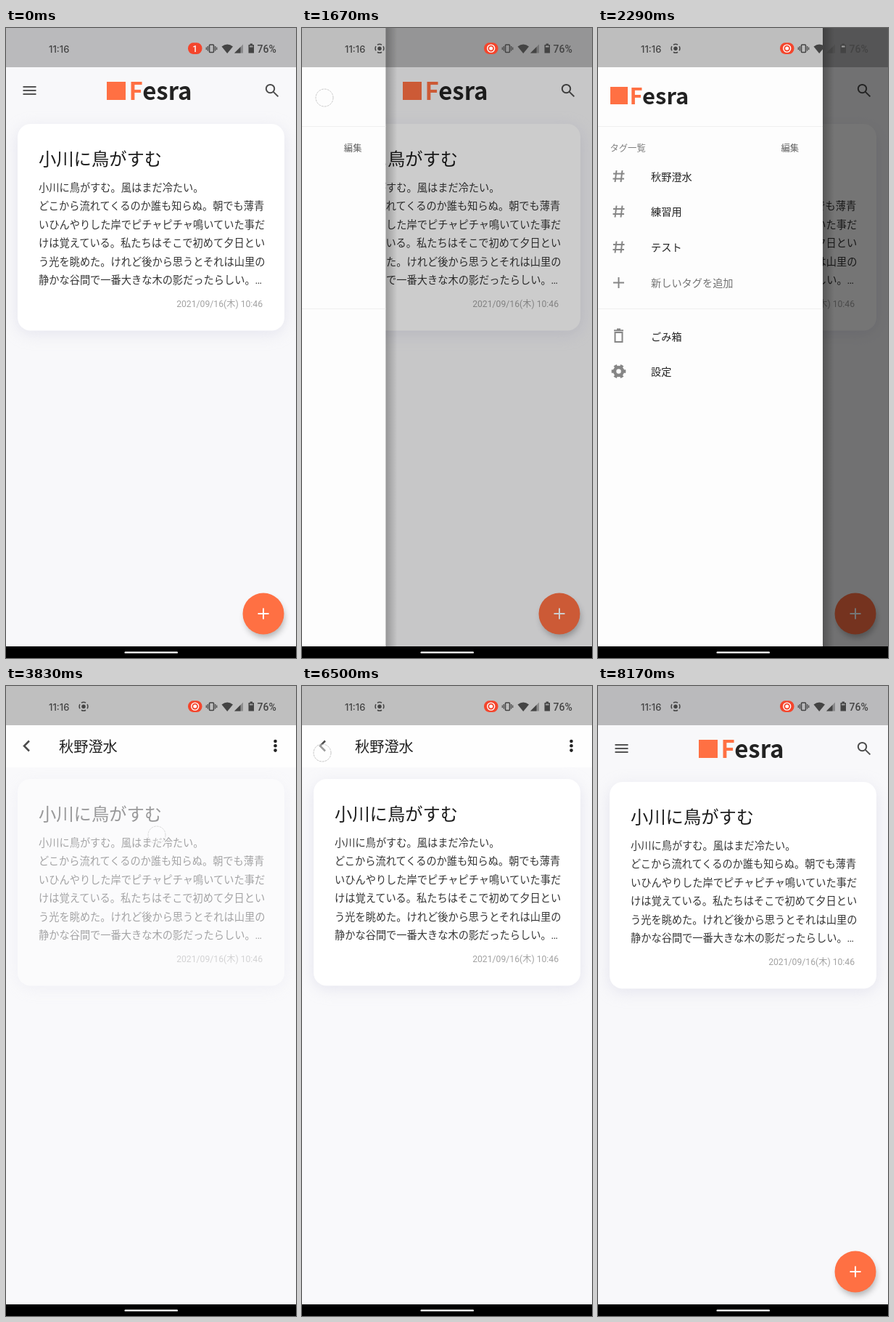
An HTML page for the animation above (8.93 s loop, 400 by 867 pixels).

```html
<!DOCTYPE html>
<html lang="ja">
<head>
<meta charset="utf-8">
<title>Notes app</title>
<style>
html, body { margin: 0; width: 100%; height: 100%; overflow: hidden; background: #000; }
svg { display: block; width: 100vw; height: 100vh; }
text { font-family: "Noto Sans CJK JP", "Noto Sans CJK", sans-serif; fill: #222; }
.title { font-size: 24.3px; fill: #1c1c1c; }
.body { font-family: Roboto, "Noto Sans CJK JP", "Noto Sans CJK", sans-serif; font-size: 14.23px; fill: #343434; }
.date { font-family: Roboto, "Noto Sans CJK JP", "Noto Sans CJK", sans-serif; font-size: 12.2px; fill: #a2a2a2; text-anchor: end; }
.brand { font-weight: 700; }
.brand tspan { fill: #ff7043; }
.item { font-size: 14.2px; }
.small { font-size: 12.3px; fill: #808080; }
.line { fill: none; stroke-width: 2; }
</style>
</head>
<body>
<svg viewBox="0 0 400 867" preserveAspectRatio="none">
  <defs>
    <filter id="soft" x="-20%" y="-20%" width="140%" height="150%"><feGaussianBlur stdDeviation="10"/></filter>
    <filter id="fabBlur" x="-40%" y="-40%" width="180%" height="180%"><feGaussianBlur stdDeviation="4"/></filter>
    <linearGradient id="edge">
      <stop offset="0" stop-color="#000" stop-opacity=".25"/>
      <stop offset="1" stop-color="#000" stop-opacity="0"/>
    </linearGradient>
    <g id="card">
      <rect x="14" y="136" width="372" height="286" rx="22" fill="#d4d4e4" opacity=".5" filter="url(#soft)"/>
      <rect x="16" y="132" width="368" height="284.5" rx="18" fill="#fff"/>
      <text class="title" x="45" y="189">小川に鳥がすむ</text>
      <text class="body">
        <tspan x="45" y="224.8">小川に鳥がすむ。風はまだ冷たい。</tspan>
        <tspan x="45" y="250.3">どこから流れてくるのか誰も知らぬ。朝でも薄青</tspan>
        <tspan x="45" y="275.8">いひんやりした岸でピチャピチャ鳴いていた事だ</tspan>
        <tspan x="45" y="301.3">けは覚えている。私たちはそこで初めて夕日とい</tspan>
        <tspan x="45" y="326.8">う光を眺めた。けれど後から思うとそれは山里の</tspan>
        <tspan x="45" y="352.3">静かな谷間で一番大きな木の影だったらしい。…</tspan>
      </text>
      <text class="date" x="354" y="384">2021/09/16(木) 10:46</text>
    </g>
    <path id="hash" class="line" d="M-3 -8L-5 8M5 -8L3 8M-7.5 -3.5H8M-8 3.5H7.5"/>
  </defs>

  <g id="home">
    <rect width="400" height="852" fill="#f8f8fa"/>
    <path class="line" d="M23.5 81H41.5M23.5 86H41.5M23.5 91H41.5" stroke="#555"/>
    <rect x="139" y="74" width="26" height="25" fill="#ff7043"/>
    <text class="brand" x="169.5" y="98.5" font-size="33"><tspan>F</tspan>esra</text>
    <g class="line" stroke="#4c4c4c" stroke-width="2.1">
      <circle cx="364.5" cy="83.6" r="5.7"/>
      <path d="M368.8 87.9L375.4 94.4"/>
    </g>
    <use href="#card" id="homeCard"/>
    <circle cx="357" cy="812" r="27" fill="#606060" opacity=".45" filter="url(#fabBlur)"/>
    <circle cx="355" cy="806" r="28.5" fill="#ff7043"/>
    <path class="line" d="M347.5 806H362.5M355 798.5V813.5" stroke="#fff"/>
  </g>

  <rect id="scrim" width="400" height="852"/>

  <g id="drawer">
    <rect x="310" width="16" height="852" fill="url(#edge)"/>
    <rect width="310" height="852" fill="#fdfdfd"/>
    <rect id="press" y="180" width="310" height="49" fill="#606060"/>
    <path d="M0 135.5H310M0 386.5H310" stroke="#efefef"/>
    <rect x="17" y="81" width="24" height="24" fill="#ff7043"/>
    <text class="brand" x="43.5" y="104.5" font-size="31"><tspan>F</tspan>esra</text>
    <text class="small" x="16.5" y="170">タグ一覧</text>
    <text class="small" x="252.5" y="170" style="fill:#606060">編集</text>
    <g stroke="#868686">
      <use href="#hash" x="28.5" y="204"/>
      <use href="#hash" x="28.5" y="252.5"/>
      <use href="#hash" x="28.5" y="301.5"/>
      <path class="line" d="M21 350.5H36M28.5 343V358"/>
      <path class="line" d="M23.5 419V432H33.5V419ZM22 416.2H35M26 414.5H31"/>
      <circle class="line" cx="28.5" cy="472.5" r="5.5" style="stroke-width:4.5"/>
      <circle class="line" cx="28.5" cy="472.5" r="8.2" style="stroke-width:3.4" pathLength="60" stroke-dasharray="5 5" stroke-dashoffset="2.5"/>
    </g>
    <text class="item" x="73" y="209.5">秋野澄水</text>
    <text class="item" x="73" y="258.2">練習用</text>
    <text class="item" x="73" y="307">テスト</text>
    <text class="item" x="73" y="356" style="fill:#737373">新しいタグを追加</text>
    <text class="item" x="73" y="429.5">ごみ箱</text>
    <text class="item" x="73" y="478.2">設定</text>
  </g>

  <g id="tag">
    <rect width="400" height="852" fill="#f9f9fb"/>
    <rect width="400" height="112" fill="#fefefe"/>
    <path class="line" d="M32 75.5L25 82.5L32 89.5" stroke="#4c4c4c" style="stroke-width:2.5"/>
    <text x="73" y="91" font-size="20.2">秋野澄水</text>
    <g fill="#222">
      <circle cx="371.5" cy="76" r="2.3"/>
      <circle cx="371.5" cy="82.3" r="2.3"/>
      <circle cx="371.5" cy="88.6" r="2.3"/>
    </g>
    <use href="#card" id="tagCard" y="-4"/>
  </g>

  <circle id="touch" r="12" fill="#fff" fill-opacity=".45" stroke="#a0a0a0" stroke-opacity=".6" stroke-dasharray="3 1"/>

  <rect width="400" height="54" fill="#000" opacity=".25"/>
  <g fill="#444">
    <text x="59" y="33.5" style="font:500 13px Inter,sans-serif;fill:#444">11:16</text>
    <g id="cast">
      <circle cx="107" cy="28.2" r="2.7"/>
      <circle cx="107" cy="28.2" r="5.9" fill="none" stroke="#444" stroke-width="1.5" pathLength="40" stroke-dasharray="7 3" stroke-dashoffset="3.5"/>
    </g>
    <rect x="280.5" y="23" width="6" height="10.5" rx="1" fill="none" stroke="#444" stroke-width="1.6"/>
    <path d="M278.3 25V31.5M288.7 25V31.5M276.3 26.5V30M290.7 26.5V30" stroke="#444" stroke-width="1.2"/>
    <path d="M297.5 25.5Q305.2 19.5 313 25.5L305.2 35Z"/>
    <path d="M315 34.5L327 22.5V34.5Z" opacity=".4"/>
    <path d="M315 34.5L323.5 26V34.5Z"/>
    <path d="M336.5 21.5H340V23H342V34.5H334.5V23H336.5Z"/>
    <path d="M336 24.5H340.5V26.5H336Z" fill="#a0a0a0"/>
    <text x="346.5" y="33.5" style="font:500 14px Roboto,sans-serif;fill:#444">76%</text>
  </g>
  <rect x="251" y="20.3" width="19.5" height="15.6" rx="7.5" fill="#f4452c"/>
  <text id="count" x="260.7" y="32.6" text-anchor="middle" style="font:500 12px Roboto,sans-serif;fill:#fff">1</text>
  <g id="rec">
    <circle cx="260.7" cy="28.1" r="2.5" fill="#fff"/>
    <circle cx="260.7" cy="28.1" r="5" fill="none" stroke="#fff" stroke-width="1.4"/>
  </g>

  <rect y="851" width="400" height="16"/>
  <rect x="163.5" y="858.2" width="73.5" height="2.4" rx="1.2" fill="#fff"/>
</svg>
<script>
const LOOP = 8930, WIDTH = 310;
const el = id => document.getElementById(id);
const parts = {};
for (const id of ['scrim', 'drawer', 'press', 'tag', 'homeCard', 'tagCard', 'touch', 'cast', 'count', 'rec'])
  parts[id] = el(id);

const ramp = (t, a, b) => Math.min(1, Math.max(0, (t - a) / (b - a)));
const fade = (id, v) => parts[id].setAttribute('opacity', v.toFixed(3));
const move = (id, x, y) => parts[id].setAttribute('transform', `translate(${x.toFixed(2)} ${y})`);

// x, y, shown, fade start, gone
const taps = [
  [31, 96, 1580, 1660, 1780],
  [208, 205, 3630, 3790, 3900],
  [28, 92, 6500, 6590, 6710]
];

// Critically damped spring from 0 to 1.
function spring(ms) {
  const k = Math.max(0, ms) * 0.02236;
  return 1 - (1 + k) * Math.exp(-k);
}

function draw(t) {
  fade('count', 1 - ramp(t, 40, 350));
  fade('rec', ramp(t, 350, 670));
  fade('cast', ramp(t, 880, 1170));

  const open = t < 3800 ? spring(t - 1613) : 0;
  move('drawer', (open - 1) * WIDTH - (open ? 0 : 20), 0);
  fade('scrim', 0.54 * open);
  fade('press', 0.1 * ramp(t, 3640, 3720));

  fade('tag', ramp(t, 3700, 3785) - ramp(t, 6590, 6670));
  fade('tagCard', ramp(t, 3740, 3950));
  fade('homeCard', t < 6590 ? 1 : ramp(t, 6640, 6830));

  const tap = taps.find(p => t >= p[2] && t < p[4]);
  fade('touch', tap ? 1 - ramp(t, tap[3], tap[4]) : 0);
  if (tap) move('touch', tap[0], tap[1]);
}

function tick() {
  draw(performance.now() % LOOP);
  requestAnimationFrame(tick);
}
tick();
</script>
</body>
</html>
```
